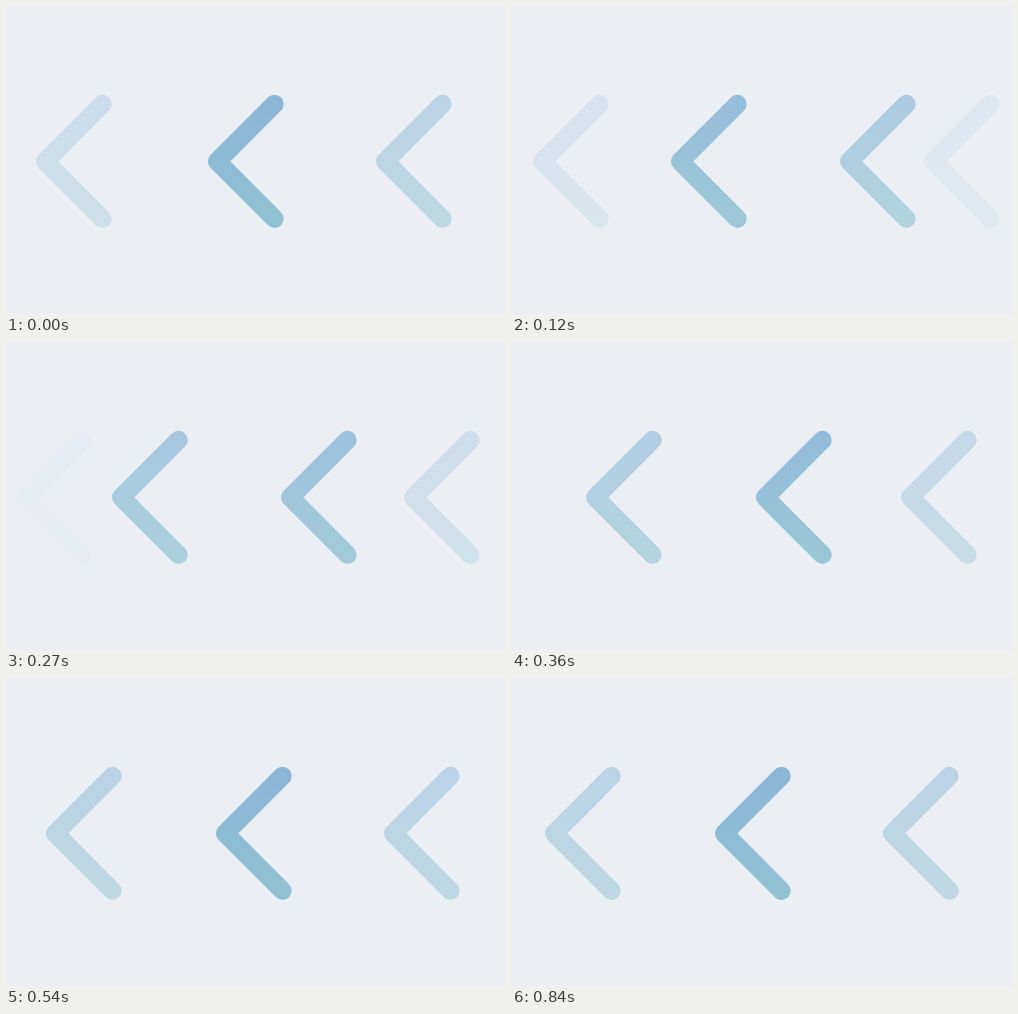
An HTML page that plays this animation: 500x308 px, repeating every 0.9 s.

```html
<!DOCTYPE html>
<html lang="en">
<head>
<meta charset="utf-8">
<title>Sliding chevrons</title>
<style>
  html, body { margin: 0; width: 100%; height: 100%; overflow: hidden; background: #ebeff4; }
  svg { display: block; width: 500px; height: 308px; }
  path { fill: none; stroke: url(#tint); stroke-width: 18.5; stroke-linecap: round; stroke-linejoin: round; }
</style>
</head>
<body>
<svg id="stage" viewBox="0 0 500 308">
  <linearGradient id="tint" gradientUnits="userSpaceOnUse" x1="0" y1="89" x2="0" y2="222">
    <stop offset="0" stop-color="#89b5d8"/>
    <stop offset="1" stop-color="#90c3d2"/>
  </linearGradient>
</svg>
<script>
const LOOP = 900, SLIDE = 450, STEP = 30, DRIFT = 10;
const stage = document.getElementById('stage');
const mix = (a, b, k) => a + (b - a) * k;

// Left edge and opacity at the start and end of the slide
const chevrons = [
  { x: [30, -3], alpha: [0.33, -0.12] },
  { x: [202, 42], alpha: [1, 0.5] },
  { x: [370, 212], alpha: [0.5, 1] },
  { x: [424, 380], alpha: [0, 0.5] },
];

for (const c of chevrons) {
  c.path = document.createElementNS('http://www.w3.org/2000/svg', 'path');
  c.path.setAttribute('d', 'M66.5 98L9.25 155.4L66.5 212.8');
  stage.append(c.path);
}

function draw(now) {
  const t = Math.min(Math.floor((now % LOOP) / STEP) * STEP, LOOP - 2 * STEP);
  const slide = Math.min(t / SLIDE, 1);
  const drift = DRIFT * Math.max(0, (t - SLIDE) / (LOOP - SLIDE));
  for (const { path, x, alpha } of chevrons) {
    path.setAttribute('transform', `translate(${Math.round(mix(...x, slide) - drift)})`);
    path.setAttribute('opacity', Math.max(0, mix(...alpha, slide)));
  }
}

const start = performance.now();
function tick() {
  draw(performance.now() - start);
  requestAnimationFrame(tick);
}
tick();
</script>
</body>
</html>
```
